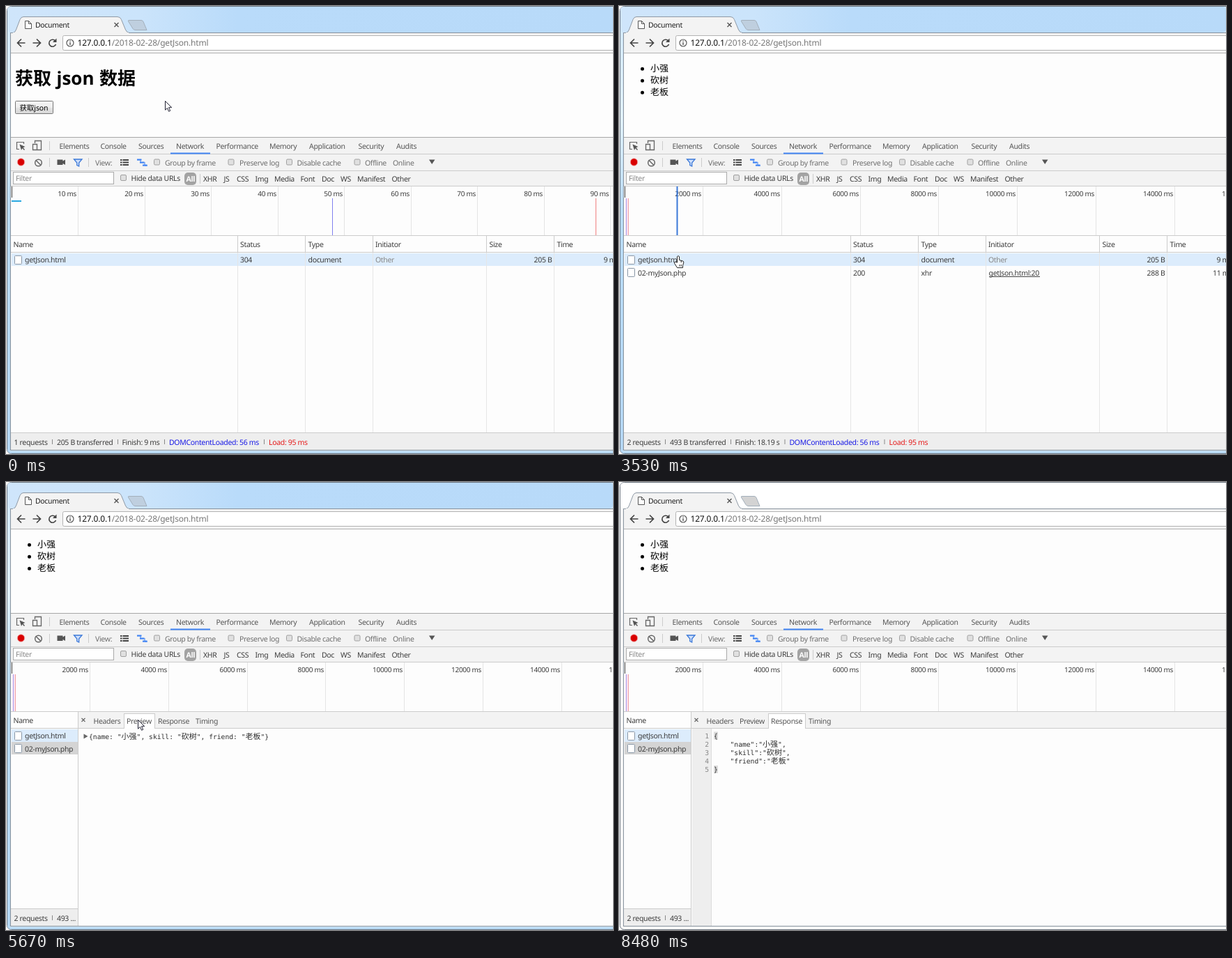
Write an HTML page that moves like this. It is 871 px wide and 643 px high and loops after 8.62 s.

```html
<!DOCTYPE html>
<html lang="zh-CN">
<head>
<meta charset="utf-8">
<title>Document</title>
<style>
html, body { margin: 0; width: 100%; height: 100%; overflow: hidden; background: #fff; }
svg { display: block; }
text {
  font: 10.5px "Noto Sans", "Noto Sans CJK SC", sans-serif;
  letter-spacing: -.33px; fill: #3c3c3c; text-rendering: geometricPrecision;
}
.end { text-anchor: end; }
.b { font-weight: 700; fill: #484848; }
.menu { fill: #555; }
.dim { fill: #6e6e6e; }
.white { fill: #fff; }
.tick { font-size: 10px; letter-spacing: -.3px; text-anchor: end; }
.url { font-size: 12px; letter-spacing: -.18px; }
.h1 { font-size: 26px; font-weight: 700; letter-spacing: 0; fill: #000; }
.li { font-size: 13px; letter-spacing: 0; fill: #000; }
.btn { fill: #000; letter-spacing: -.1px; }
.tip { font-size: 10.9px; }
.mono { font: 9.68px "DejaVu Sans Mono", "Noto Sans CJK SC", monospace; letter-spacing: 0; fill: #2c2c2c; }
.mono tspan { font-size: 11px; }
.path { fill: #777; }
</style>
</head>
<body>
<svg id="stage" width="871" height="643" viewBox="0 0 871 643" xmlns="http://www.w3.org/2000/svg"></svg>
<script>
const LOOP = 8620;
const CLICKS = [2630, 4110, 5290, 6690];
const LOADED = 2760, OPENED = 4310, PREVIEW = 5520, RESPONSE = 6890, BLUR = 8480;

// Pointer positions: time, x, y
const PATH = [
  [0, 228, 136], [999, 228, 136], [1000, 237, 129], [1209, 237, 129], [1210, 221, 130],
  [1369, 221, 130], [1370, 228, 136], [1520, 228, 136], [1700, 165, 148], [1860, 90, 151],
  [2010, 50, 145], [3290, 50, 145], [3430, 83, 265], [3530, 85, 359], [3640, 87, 376],
  [3870, 81, 385], [4580, 81, 385], [4740, 106, 372], [4920, 154, 352], [5020, 189, 341],
  [5800, 189, 341], [6010, 150, 372], [6220, 118, 392], [6400, 158, 374], [6630, 232, 341],
  [7270, 232, 341], [7450, 520, 375], [7630, 840, 431], [LOOP, 840, 431]
];

const text = (x, y, s, cls = '', fill = '') =>
  `<text x="${x}" y="${y}" class="${cls}"${fill && ` style="fill:${fill}"`}>${s}</text>`;
const rect = (x, y, w, h, fill, extra = '') =>
  `<rect x="${x}" y="${y}" width="${w}" height="${h}" fill="${fill}" ${extra}/>`;
const box = (x, y, w, h, fill, stroke, r = 0) =>
  rect(x + .5, y + .5, w - 1, h - 1, fill, `stroke="${stroke}" rx="${r}"`);
const path = (d, stroke = 'none', fill = 'none', w = 1) =>
  `<path d="${d}" stroke="${stroke}" fill="${fill}" stroke-width="${w}"/>`;
const circle = (x, y, r, stroke, fill = 'none', w = 1) =>
  `<circle cx="${x}" cy="${y}" r="${r}" stroke="${stroke}" fill="${fill}" stroke-width="${w}"/>`;
const hline = (y, color = '#ccc', x = 7, end = 871) => rect(x, y, end - x, 1, color);
const vline = (x, y, end, color = '#ccc') => rect(x, y, 1, end - y, color);
const group = (id, ...parts) => `<g id="${id}">${parts.join('')}</g>`;
const row = (items, y, cls) => items.map(([x, s]) => text(x, y, s, cls)).join('');
const range = n => [...Array(n).keys()];
const check = (x, y) => box(x - 4.5, y - 4.5, 9, 9, '#e0e0e0', '#a0a0a0', 1.5);
const sheet = y => box(12, y, 11, 13, '#fff', '#8997a6', 1);
const han = s => `<tspan>${s}</tspan>`;

const frame = [
  box(1, 0, 900, 643, '#f7f7f7', '#6d7680', 6),
  rect(2, 1, 869, 37, '#fff', 'rx="5"'),
  group('glass',
    rect(2, 1, 900, 641, 'url(#side)', 'rx="5"'),
    rect(2, 1, 869, 37, 'url(#sky)', 'rx="5"'),
    hline(638, '#d8ecfa', 5), rect(5, 639, 866, 3, '#b6d8f3')),
  box(6, 38, 900, 600, '#fdfdfd', '#87929d'),
  rect(7, 39, 864, 28, '#f3f3f3'),
  path('M7 38.5H10Q13 38 14.500 34L20 19.500Q21.500 15.500 25 15.500H160Q164 15.500 165.500 19.500L171.500 34Q173 38 177 38.500', '#8e99a5', '#f3f3f3'),
  rect(10, 38, 166, 2, '#f3f3f3'),
  '<path id="newTab" d="M176 20.500H194Q196 20.500 197 22.500L202 34.500H186Q183 34.500 182 32.500L175.500 22Q175 20.500 176 20.500Z" stroke="#a3afbb"/>',
  path('M27.500 21.500H32.500L36.500 25.500V32.500H27.500ZM32.500 21.500V25.500H36.500', '#555', '#fff'),
  text(42, 31, 'Document', '', '#222'),
  path('M155.500 24L161.500 30M161.500 24L155.500 30', '#555', 'none', 1.4),
  path('M27.500 53H17M22 47.500L16.500 53L22 58.500M38.500 53H49M44 47.500L49.500 53L44 58.500', '#444', 'none', 1.7),
  path('M71 50.500A5 5 0 1 0 71.500 55', '#444', 'none', 1.7), path('M72.500 46.500V52H67Z', 'none', '#444'),
  box(81, 42, 810, 22, '#fff', '#b3b3b3', 2),
  circle(92, 53, 5, '#555', 'none', 1.2), rect(91.3, 52, 1.4, 4, '#555'), rect(91.3, 49.6, 1.4, 1.4, '#555'),
  text(102.5, 57, '127.0.0.1<tspan class="path">/2018-02-28/getJson.html</tspan>', 'url', '#111'),
  hline(67, '#b3b3b3')
];

const page = [
  group('intro',
    row([[13, '获取'], [72.5, 'json'], [134, '数据']], 113, 'h1'),
    box(13, 136, 55, 19, 'url(#button)', '#777', 1),
    text(19.5, 150, '获取json', 'btn')),
  group('list', ...['小强', '砍树', '老板'].map((s, i) =>
    circle(33.5, 90.3 + 17 * i, 2.5, 'none', '#000') + text(45, 94.3 + 17 * i, s, 'li')))
];

const toolbar = [
  rect(7, 188, 864, 71, '#f3f3f3'), hline(188, '#a8a8a8'), hline(212), hline(236), hline(258),
  path('M25.500 198V195.500H15.500V205.500H19', '#666', 'none', 1.2),
  path('M19.500 198.500L27.500 202L24.500 203.300L27 206L26 207L23.400 204.300L22 207Z', 'none', '#555'),
  path('M41.500 197V193.500H50.500V206.500H45M38.500 198.500H44.500V206.500H38.500Z', '#666', 'none', 1.3),
  vline(62, 194, 207), vline(62, 218, 231), vline(118, 218, 231), vline(278, 241, 255),
  row([[76.5, 'Elements'], [135.5, 'Console'], [190, 'Sources'], [244, 'Network'], [301.5, 'Performance'],
    [378, 'Memory'], [435, 'Application'], [505.5, 'Security'], [560, 'Audits']], 205, 'menu'),
  rect(236, 210.5, 57, 2, '#4285f4'),
  circle(21.5, 224, 5.3, '#f3b0b0', '#d90000'),
  circle(46.5, 225, 4.8, '#666', 'none', 1.5), path('M43 221.500L50 228.500', '#666', 'none', 1.5),
  path('M73.500 220.500H81.500V222.500L85 220.500V228L81.500 226V228H73.500Z', 'none', '#555'),
  path('M97.500 220H109L104.700 225V230L101.800 228.500V225Z', '#3b78d8', '#cfe0fb', 1.3),
  range(3).map(i => rect(164, 220 + 3.5 * i, 2.5, 2, '#444') + rect(167.5, 220 + 3.5 * i, 8.5, 2, '#444')).join(''),
  range(3).map(i => rect(188 + 4 * i, 219.5 + 4 * i, 6.5, 2.2, '#4285f4')).join(''),
  path('M193 221V224.500H196M199 224V229H203', '#4285f4'),
  [216.5, 323, 406.5, 504].map(x => check(x, 224)).join(''), check(168.5, 246.5),
  row([[128, 'View:'], [228, 'Group by frame'], [335, 'Preserve log'], [417.5, 'Disable cache'], [515, 'Offline'], [555, 'Online']], 229, 'dim'),
  path('M607 220.500H615.500L611.200 227Z', 'none', '#555'),
  box(10, 238, 145, 18, '#fff', '#aaa'), text(14, 251, 'Filter', '', '#888'),
  text(179.5, 251, 'Hide data URLs'),
  rect(256, 239, 17, 18, '#a3a3a3', 'rx="5"'), text(258.5, 252, 'All', 'b white'),
  row([[283, 'XHR'], [312.5, 'JS'], [331, 'CSS'], [357.5, 'Img'], [385, 'Media'], [422.5, 'Font'], [453, 'Doc'],
    [480, 'WS'], [504, 'Manifest'], [553.5, 'Other']], 252)
];

const ruler = (n, first, step, unit) => range(n).map(i => {
  const x = Math.round(first + step * i);
  return vline(x, 259, 329, '#e4e4e4') + text(x - 2, 273, unit * (i + 1) + ' ms', 'tick');
}).join('');
const overview = [
  group('early', ruler(9, 103, 95.5, 10), rect(8, 279, 14, 2, '#29a8e0'),
    vline(468, 276, 329, '#7f7fee'), vline(846, 276, 329, '#f08080')),
  group('late', ruler(8, 120, 112.8, 2000), rect(9, 276, 5, 53, '#fbe4ee'),
    vline(10, 276, 329, '#a9a2f2'), vline(13, 276, 329, '#f3a0a8')),
  vline(8, 259, 275, '#444'),
  group('hair', rect(0, 259, 2, 70, '#3b78d8'))
];

const sep = x => vline(x, 622, 629, '#888');
const status = (id, count, size, finish, shift) => group(id,
  row([[11.5, `${count} requests`], [73, `${size} B transferred`], [166.5, `Finish: ${finish}`]], 629.5),
  [66, 160, 227 + shift, 370 + shift].map(sep).join(''),
  text(234 + shift, 629.5, 'DOMContentLoaded: 56 ms', '', '#1a1ae6'),
  text(377 + shift, 629.5, 'Load: 95 ms', '', '#e61a1a'));
const cells = (y, code, type, size, time, x) =>
  row([[336, code], [433.5, type], [x, time]], y) + text(783.5, y, size, 'end');
const table = [
  hline(329), hline(353),
  rect(8, 355, 863, 18, '#dcecfc'),
  '<rect id="row2" x="8" y="373" width="863" height="18"/>',
  [332, 429, 526, 689, 786].map(x => vline(x, 330, 353) + vline(x, 354, 612, '#e6e6e6')).join(''),
  row([[10.5, 'Name'], [336, 'Status'], [433.5, 'Type'], [530, 'Initiator'], [693.5, 'Size'], [790.5, 'Time']], 345.5),
  cells(368, 304, 'document', '205 B', '9 ms', 857.5), text(530, 368, 'Other', '', '#888'),
  sheet(358), text(27, 368, 'getJson.html'),
  group('second', sheet(376), '<text id="name2" x="27" y="386.500">02-myJson.php</text>',
    cells(386.5, 200, 'xhr', '288 B', '11 ms', 852),
    text(530.5, 386.5, 'getJson.html:20'), rect(531, 388, 73, 1, '#444')),
  rect(7, 612, 864, 25, '#eee'), hline(612),
  status('before', 1, 205, '9 ms', 0), status('after', 2, 493, '18.19 s', 10.5)
];

const fields = (y, step, list) => list.map(([key, x, value], i) =>
  text(129, y + step * i, key + ':', 'b') + text(x, y + step * i, value, 'mono')).join('');
const section = (y, name, x) =>
  path(`M111.500 ${y - 7}H118.500L115 ${y - 1}Z`, 'none', '#666') + text(121, y, name, 'b') + text(x, y, 'view source', 'dim');
const closed = y => path(`M111.500 ${y - 3.5}V${y + 3.5}L117.500 ${y}Z`, 'none', '#666');
const tab = (id, x, w) => group(id, box(x, 332, w, 22, '#fff', '#ccc'), rect(x + 1, 353, w - 2, 1, '#fff'));
const hover = (id, x, w) => group(id, rect(x, 332, w, 21, '#e0e0e0'));

const detail = group('detail',
  rect(104, 330, 767, 307, '#fdfdfd'), vline(103, 330, 637),
  rect(7, 612, 96, 25, '#eee'), hline(612, '#ccc', 7, 103),
  text(11.5, 629.5, '2 requests'), sep(66), text(73, 629.5, '493 ...'),
  rect(104, 330, 767, 23, '#f3f3f3'), hline(353, '#ccc', 104),
  path('M108.500 339L113.500 344M113.500 339L108.500 344', '#666', 'none', 1.2),
  hover('overPreview', 169, 45), hover('overResponse', 214, 53),
  tab('tabHeaders', 121, 48), tab('tabPreview', 169, 45), tab('tabResponse', 214, 54),
  row([[125.5, 'Headers'], [173, 'Preview'], [218, 'Response'], [272, 'Timing']], 347, 'menu'),
  group('headers',
    closed(363.5), text(121, 367.5, 'General', 'b'), hline(372, '#e4e4e4', 105),
    section(385.5, 'Response Headers', 238),
    fields(401.3, 14.55, [
      ['Connection', 194, 'Keep-Alive'], ['Content-Length', 216, '63'], ['Content-Type', 206, 'text/html'],
      ['Date', 160, 'Wed, 28 Feb 2018 09:41:00 GMT'], ['Keep-Alive', 191, 'timeout=5, max=100'],
      ['Server', 170, 'Apache/2.2.21 (Win32) PHP/5.3.10'], ['X-Powered-By', 209, 'PHP/5.3.10']]),
    hline(495, '#e4e4e4', 105),
    section(509, 'Request Headers', 231),
    fields(524.8, 14.6, [
      ['Accept', 171, '*/*'], ['Accept-Encoding', 222, 'gzip, deflate, br'],
      ['Accept-Language', 224.5, 'zh-CN,zh;q=0.9,en;q=0.8'], ['Connection', 194, 'keep-alive'],
      ['Host', 160, '127.0.0.1'], ['Referer', 173.5, 'http://127.0.0.1/2018-02-28/getJson.html'],
      ['User-Agent', 193.5, 'Mozilla/5.0 (Windows NT 6.1; Win64; x64) AppleWebKit/537.36 (KHTML, like Gecko) Chrome/64.0.3282.186 Safari/537.36']])),
  group('preview', closed(365),
    text(119, 368.5, `{name: "${han('小强')}", skill: "${han('砍树')}", friend: "${han('老板')}"}`, 'mono')),
  group('response',
    rect(105, 354, 27, 283, '#eee'), vline(132, 354, 637, '#ddd'),
    range(5).map(i => text(129, 367.5 + 12.1 * i, i + 1, 'mono end', '#888')).join(''),
    [0, 1].map(i => rect(136, 358.5 + 48.4 * i, 6, 11, '#ddd') + text(136, 367.5 + 48.4 * i, '{}'[i], 'mono')).join(''),
    [['name', '小强', ','], ['skill', '砍树', ','], ['friend', '老板', '']].map(([k, v, comma], i) =>
      text(159.5, 379.5 + 12.1 * i, `"${k}":"${han(v)}"${comma}`, 'mono')).join('')));

const pointer = [
  group('tip', box(88, 398, 221, 22, '#f8f8f8', '#c4c4c4', 1), text(96, 413, 'http://127.0.0.1/2018-02-28/02-myJson.php', 'tip', '#666')),
  group('cursor',
    group('arrow', path('M.5 .5V13.200L3.400 10.500L5.600 15.300L7.700 14.300L5.500 9.700H9.700Z', '#223', '#fff')),
    group('hand', path('M-1.500 9V.5Q0 -1.500 1.500 .5V5.500L6 6.700Q8 7 7.800 9L6.500 13.500V16.500H-1.500L-5.500 10Q-6 8 -4 8Z', '#222', '#fff'),
      path('M2 12V14.500M4.300 12V14.500M4.200 6.500V9', '#222'))),
  '<circle id="ring" fill="none" stroke="#333" stroke-width="1.200"/>'
];

const gradient = (id, dir, stops) => `<linearGradient id="${id}" x1="0" y1="0" ${dir}>` +
  stops.map(([o, c]) => `<stop offset="${o}" stop-color="${c}"/>`).join('') + '</linearGradient>';
const defs = gradient('sky', 'x2="1" y2="0"', [[0, '#cfe5fb'], [.22, '#cbe4fb'], [.38, '#b9dbfa'], [1, '#b8daf9']]) +
  gradient('side', 'x2="0" y2="1"', [[0, '#cfe6f9'], [.25, '#e0f0fb'], [.45, '#b9dbf5'], [1, '#b4d6f3']]) +
  gradient('button', 'x2="0" y2="1"', [[0, '#f5f5f5'], [.5, '#eee'], [.52, '#e4e4e4'], [1, '#d8d8d8']]);

const stage = document.getElementById('stage');
stage.innerHTML = `<defs>${defs}</defs>` +
  [frame, page, toolbar, overview, table, [detail], pointer].flat().join('');

const parts = Object.fromEntries([...stage.querySelectorAll('[id]')].map(e => [e.id, e]));
const show = (id, on) => { parts[id].style.display = on ? '' : 'none'; };
const within = (t, a, b) => t >= a && t < b;

function pointAt(t) {
  const i = PATH.findIndex(p => p[0] > t);
  const [t0, x0, y0] = PATH[i - 1], [t1, x1, y1] = PATH[i];
  const k = (t - t0) / (t1 - t0);
  return [x0 + (x1 - x0) * k, y0 + (y1 - y0) * k];
}

const SPANS = {
  glass: [0, BLUR], cursor: [0, BLUR],
  intro: [0, LOADED], early: [0, LOADED], before: [0, LOADED],
  list: [LOADED, LOOP], late: [LOADED, LOOP], second: [LOADED, LOOP], after: [LOADED, LOOP],
  hair: [3425, 3560], tip: [3800, 4140], detail: [OPENED, LOOP],
  headers: [OPENED, PREVIEW], tabHeaders: [OPENED, PREVIEW], overPreview: [4980, PREVIEW],
  preview: [PREVIEW, RESPONSE], tabPreview: [PREVIEW, RESPONSE], overResponse: [6570, RESPONSE],
  response: [RESPONSE, LOOP], tabResponse: [RESPONSE, LOOP]
};

function draw(t) {
  const [x, y] = pointAt(t);
  for (const id in SPANS) show(id, within(t, ...SPANS[id]));

  parts.newTab.setAttribute('fill', t < BLUR ? '#bfcfdf' : '#d3d3d3');
  parts.hair.setAttribute('transform', `translate(${Math.min(x, 82.5)})`);
  parts.tip.style.opacity = Math.min(1, Math.max(0, (t - 3815) / 145));

  const selected = within(t, OPENED, PREVIEW);
  parts.row2.setAttribute('fill', selected ? '#3879d9' : t >= PREVIEW ? '#d4d4d4' : within(t, 3620, OPENED) ? '#eff5fd' : 'none');
  parts.name2.style.fill = selected ? '#fff' : '';

  const onRow = t >= LOADED && x < 103 && within(y, 355, 392);
  show('hand', onRow);
  show('arrow', !onRow);
  parts.cursor.setAttribute('transform', `translate(${x} ${y})`);

  const click = CLICKS.find(c => within(t, c, c + (c === CLICKS[0] ? 160 : 200)));
  show('ring', click !== undefined);
  if (click !== undefined) {
    parts.ring.setAttribute('cx', x + 1.5);
    parts.ring.setAttribute('cy', y + 1);
    parts.ring.setAttribute('r', 4 + (t - click) / 24);
  }
}

function tick() {
  draw(performance.now() % LOOP);
  requestAnimationFrame(tick);
}
tick();
</script>
</body>
</html>
```
